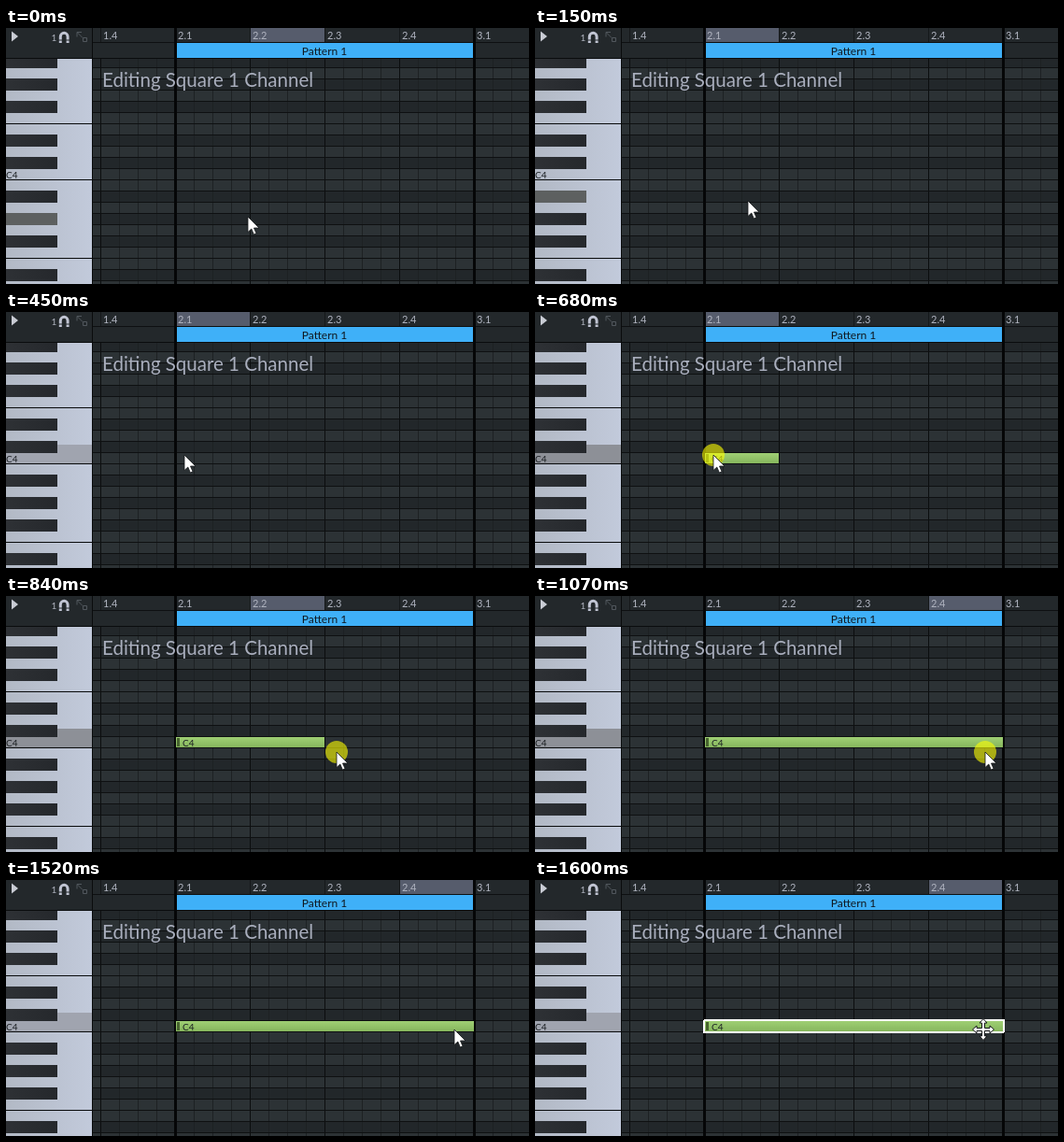
Recreate the animation shown at these times as an HTML page. Size 560 px wide and 274 px high, loop 1760 ms.

```html
<!DOCTYPE html>
<html lang="en">
<head>
<meta charset="utf-8">
<title>Piano roll</title>
<style>
  html, body { margin: 0; width: 100%; height: 100%; overflow: hidden; background: #22272a; }
  svg { display: block; width: 560px; height: 274px; }
  text { font-family: Lato, "Open Sans", sans-serif; }
  .ruler { font-size: 11px; fill: #b0b4c0; }
  .label { font-size: 10px; fill: #1c2024; }
  rect, .crisp { shape-rendering: crispEdges; }
</style>
</head>
<body>
<svg viewBox="0 0 560 274">
  <defs>
    <linearGradient id="ivory"><stop stop-color="#b2b9c5"/><stop offset="1" stop-color="#c2cadb"/></linearGradient>
    <linearGradient id="ebony"><stop stop-color="#2e3135"/><stop offset="1" stop-color="#25282c"/></linearGradient>
    <linearGradient id="green" x2="0" y2="1"><stop stop-color="#9fcf74"/><stop offset="1" stop-color="#86b65d"/></linearGradient>
  </defs>

  <g id="grid"></g>
  <text x="103" y="63" font-size="20.5" fill="#a9aebd">Editing Square 1 Channel</text>

  <g id="keys"></g>
  <path id="hover" class="crisp"/>
  <g id="seams"></g>
  <text class="label" x="0" y="161">C4</text>

  <rect width="560" height="33" fill="#23282b"/>
  <rect id="beat" y="0" width="79" height="15" fill="#565c6c"/>
  <g id="header"></g>
  <rect x="183" y="16" width="317" height="16" fill="#3fb0f8"/>
  <text x="341" y="28.5" font-size="12" text-anchor="middle" fill="#101820">Pattern 1</text>

  <path d="M6 3.5V14.5L13 9Z" fill="#c9ccd4"/>
  <text x="48.5" y="14" font-size="10" fill="#b0b4c0">1</text>
  <path d="M58.3 16V9.2a3.9 3.9 0 0 1 7.8 0V16" fill="none" stroke="#c0c4d2" stroke-width="3"/>
  <path d="M56 13h12" stroke="#23282b"/>
  <g fill="none" stroke="#51575d">
    <path d="M76 9.5V4.5H81M76.5 5L82 10.5"/>
    <path d="M82.5 10.5h4v4h-4z"/>
  </g>

  <g id="note">
    <rect id="body" x="182" y="151" height="11" fill="url(#green)"/>
    <rect x="183" y="152" width="3" height="9" fill="#47642f"/>
    <text class="label" x="189" y="160.5">C4</text>
    <rect id="outline" x="181" y="150" width="321" height="13" rx="1" fill="none" stroke="#fff" stroke-width="2"/>
  </g>

  <g id="pointer">
    <circle id="press" r="12" fill="#ff0" fill-opacity=".6"/>
    <path id="arrow" d="M0 0V16.5L3.8 13L6.4 19L9 17.8L6.5 12H12Z" fill="#fff" stroke="#15181a" stroke-width=".8"/>
    <path id="move" d="M-1.5-1.5V-7H-4L0-11.5L4-7H1.5V-1.5H7V-4L11.5 0L7 4V1.5H1.5V7H4L0 11.5L-4 7H-1.5V1.5H-7V4L-11.5 0L-7-4V-1.5Z" fill="#fff" stroke="#15181a"/>
  </g>
</svg>

<script>
const $ = id => document.getElementById(id);
const LOOP = 1760, ROW = 12, BEAT = 80, BAR = 181;

function add(parent, tag, attributes) {
  const el = document.createElementNS('http://www.w3.org/2000/svg', tag);
  for (const [name, value] of Object.entries(attributes)) el.setAttribute(name, value);
  return $(parent).appendChild(el);
}

const rect = (parent, x, y, width, height, fill) =>
  add(parent, 'rect', { x, y, width, height, fill });

// Rows are counted downwards from C4, whose top is at y = 150.
const pitch = row => (24 - row) % 12;
const isBlack = row => [1, 3, 6, 8, 10].includes(pitch(row));
const rowTop = row => 150 + ROW * row;

rect('keys', 0, 33, 92, 241, 'url(#ivory)');
for (let row = -10; row <= 10; row++) {
  const y = rowTop(row);
  rect('grid', 93, y, 467, ROW, isBlack(row) ? '#22272a' : '#2c3235');
  if (isBlack(row)) rect('keys', 0, y, 55, 13, 'url(#ebony)');
  if ([0, 5].includes(pitch(row))) rect('seams', 0, y + ROW, 92, 1, '#080a0b');
}
for (let x = 101; x < 560; x += 20)
  rect('grid', x, 33, 1, 241, (x - 101) % BEAT ? '#1d2123' : '#0b0d0e');
for (let row = -10; row <= 10; row++) rect('grid', 93, rowTop(row), 467, 1, '#0e1011');

rect('header', 0, 32, 560, 1, '#0a0c0d');
rect('header', 93, 15, 467, 1, '#0e1011');
['1.4', '2.1', '2.2', '2.3', '2.4', '3.1'].forEach((label, i) => {
  const x = BAR + (i - 1) * BEAT;
  if (label.endsWith('.1')) {
    rect('grid', x - 1, 33, 3, 241, '#050607');
    rect('header', x - 1, 0, 3, 33, '#050607');
  } else {
    rect('header', x, 0, 1, 15, '#15181a');
  }
  add('header', 'text', { class: 'ruler', x: x + 3, y: 12 }).textContent = label;
});
rect('header', 92, 0, 1, 274, '#0a0c0d');

// Outline of a key, white ones widening past the black keys beside them.
function keyShape(row) {
  const y = rowTop(row);
  if (isBlack(row)) return `M0 ${y}H55V${y + 13}H0Z`;
  const y0 = y + 1, y1 = y + ROW;
  const wide0 = isBlack(row - 1) ? y0 - 9 : y0;
  const wide1 = isBlack(row + 1) ? y1 + 9 : y1;
  return `M0 ${y0}H55V${wide0}H92V${wide1}H55V${y1}H0Z`;
}

// Each pose holds until the next: start, pointer x, y, hovered row, beat, note beats, mode.
const poses = [
  [0, 259, 202, 4, 1, 0],
  [70, 246, 195, 3, 0, 0],
  [150, 228, 185, 2, 0, 0],
  [220, 210, 175, 1, 0, 0],
  [300, 197, 167, 1, 0, 0],
  [370, 193, 158, 0, 0, 0],
  [450, 191, 153, 0, 0, 0],
  [680, 191, 153, 0, 0, 1, 'press'],
  [760, 265, 161, 0, 0, 1, 'press'],
  [840, 354, 167, 0, 1, 2, 'press'],
  [920, 425, 168, 0, 2, 3, 'press'],
  [990, 468, 167, 0, 3, 4, 'press'],
  [1070, 482, 167, 0, 3, 4, 'press'],
  [1300, 482, 167, 0, 3, 4, 'release'],
  [1380, 482, 164, 1, 3, 4],
  [1520, 480, 160, 0, 3, 4],
  [1600, 480, 160, 0, 3, 4, 'move']
];

const show = (id, on) => $(id).setAttribute('display', on ? 'inline' : 'none');

function draw(time) {
  const [, x, y, row, beat, beats, mode] = poses.findLast(pose => pose[0] <= time);
  const held = mode === 'press' || mode === 'release';
  $('pointer').setAttribute('transform', `translate(${x} ${y})`);
  $('hover').setAttribute('d', keyShape(row));
  $('hover').setAttribute('fill', isBlack(row) ? '#5d6060' : held ? '#8d9097' : '#a0a4af');
  $('beat').setAttribute('x', BAR + 1 + beat * BEAT);
  $('body').setAttribute('width', Math.max(0, beats * BEAT - 1));
  show('note', beats > 0);
  show('press', mode === 'press');
  show('outline', mode === 'move');
  show('move', mode === 'move');
  show('arrow', mode !== 'move');
}

const start = performance.now();
function frame() {
  draw(Math.max(0, performance.now() - start) % LOOP);
  requestAnimationFrame(frame);
}
frame();
</script>
</body>
</html>
```
